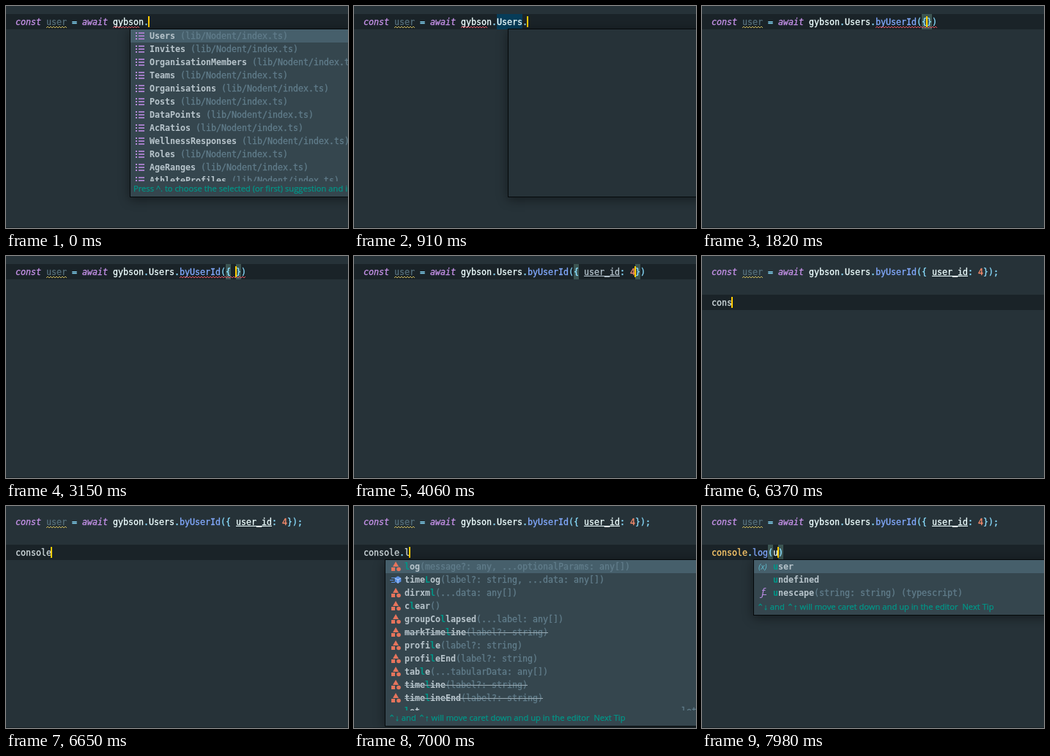
Animation of 467 by 304 pixels, one loop 8 s. Source, as an HTML page with a canvas:

```html
<!DOCTYPE html>
<html lang="en">
<head>
<meta charset="utf-8">
<title>Code completion</title>
<style>
  html, body { margin: 0; width: 100%; height: 100%; overflow: hidden; background: #263238; }
  canvas { display: block; }
</style>
</head>
<body>
<canvas id="stage" width="467" height="304"></canvas>
<script>
const ctx = document.getElementById('stage').getContext('2d');
const W = 467, H = 304, LOOP = 8000;
const LEFT = 13, CH = 7, LINE = 21, ROW = 18;
const MONO = '11.7px "DejaVu Sans Mono", monospace';
const UI = '11.2px "Open Sans", sans-serif';
const C = {
  bg: '#263238', line: '#1a2328', fg: '#eeffff', dim: '#546e7a', keyword: '#c792ea',
  punct: '#89ddff', func: '#82aaff', number: '#f78c6c', cls: '#ffcb6b', caret: '#ffcc00',
  red: '#e0525f', yellow: '#c9b458', brace: '#3c5552', usage: '#073c58',
  list: '#35464e', selected: '#465f6b', name: '#b8c5cc', note: '#617d8b', match: '#009688'
};
const colX = col => LEFT + col * CH;

// Popups: rows are [name, note, icon, deprecated]
const PATH = ' (lib/Nodent/index.ts)';
const tables = names => names.split(' ').map(n => [n, PATH, 'list']);
const methods = names => names.split(' ').map(n => [n, '(params)', 'shapes']);
const PRESS = 'Press ^. to choose the selected (or first) suggestion and insert a dot afterwards';
const MOVE = '⌃↓ and ⌃↑ will move caret down and up in the editor  Next Tip';
const POPUPS = {
  tables: { x: 169, y: 31, tip: PRESS, rows: tables('Users Invites OrganisationMembers Teams Organisations Posts DataPoints AcRatios WellnessResponses Roles AgeRanges AthleteProfiles') },
  tablesU: { x: 169, y: 31, tip: PRESS, match: 'u', rows: tables('Users UserRoles UserTeams UserInvites GroupUsers Surveys Groups Updates Results Measures Units AthleteGroups') },
  emptyMethods: { x: 210, y: 31 },
  methods: { x: 210, y: 31, tip: MOVE, rows: methods('byUserId byEmail findMany insert upsert update softDelete truncate') },
  methodsB: { x: 210, y: 31, h: 59, tip: MOVE, match: 'b', rows: methods('byUserId byEmail') },
  emptyFields: { x: 287, y: 31 },
  fields: { x: 287, y: 31, h: 41, tip: MOVE, match: 'u', rows: [['user_id', '', 'shapes']] },
  emptyConsole: { x: 0, y: 73, h: 229 },
  console: { x: 0, y: 73, h: 41, tip: MOVE, match: 'c', rows: [['console', ': Console', 'var']] },
  emptyLog: { x: 42, y: 73, h: 229 },
  log: { x: 42, y: 73, h: 229, tip: MOVE, match: 'l', rows: [
    ['log', '(message?: any, ...optionalParams: any[])', 'shapes'],
    ['timeLog', '(label?: string, ...data: any[])', 'cube'],
    ['dirxml', '(...data: any[])', 'shapes'],
    ['clear', '()', 'shapes'],
    ['groupCollapsed', '(...label: any[])', 'shapes'],
    ['markTimeline', '(label?: string)', 'shapes', true],
    ['profile', '(label?: string)', 'shapes'],
    ['profileEnd', '(label?: string)', 'shapes'],
    ['table', '(...tabularData: any[])', 'shapes'],
    ['timeline', '(label?: string)', 'shapes', true],
    ['timelineEnd', '(label?: string)', 'shapes', true],
    ['let', ' '.repeat(51) + 'let', '']
  ] },
  emptyArg: { x: 70, y: 73, h: 77 },
  arg: { x: 70, y: 73, h: 77, tip: MOVE, match: 'u', rows: [
    ['user', '', 'var'], ['undefined', '', ''], ['unescape', '(string: string) (typescript)', 'fn']
  ] }
};
const HINTS = {
  query: { x: 12, y: 34, lines: ['params: { user_id: number }', 'options?: { includeDeleted?: boolean }'] },
  log: { x: 45, y: 76, lines: ['message?: any, ...optionalParams: any[]', '...data: any[]'] }
};

// Each step patches the state of the editor
const CALL = 'gybson.Users.byUserId';
const STEPS = [
  [0, { code: 'gybson.', code3: '', caret: 26, row: 0, popup: 'tables', error: [146, 182], braces: [], hint: '', alpha: 1 }],
  [280, { code: 'gybson.U', caret: 27, popup: 'tablesU' }],
  [490, { code: 'gybson.Users', caret: 31, popup: '' }],
  [560, { usage: true }],
  [700, { code: 'gybson.Users.', caret: 32 }],
  [840, { popup: 'emptyMethods' }],
  [980, { popup: 'methods' }],
  [1260, { code: 'gybson.Users.b', caret: 33, popup: 'methodsB' }],
  [1330, { code: CALL, caret: 40, popup: '', usage: false }],
  [1540, { code: CALL + '()', caret: 41, braces: [40, 41], error: null }],
  [1750, { code: CALL + '({})', caret: 42, braces: [41, 42] }],
  [1820, { error: [237, 321] }],
  [2100, { code: CALL + '({ })', caret: 43, braces: [41, 43] }],
  [2310, { error: [237, 328] }],
  [2730, { hint: 'query' }],
  [3010, { alpha: 0.66 }],
  [3080, { alpha: 0.33 }],
  [3150, { hint: '', alpha: 1 }],
  [3360, { code: CALL + '({ u})', caret: 44, braces: [41, 44], error: null }],
  [3430, { popup: 'emptyFields' }],
  [3500, { popup: 'fields' }],
  [3640, { code: CALL + '({ user_id})', caret: 50, braces: [41, 50], popup: '' }],
  [3710, { code: CALL + '({ user_id:})', caret: 51, braces: [41, 51] }],
  [3780, { code: CALL + '({ user_id: })', caret: 52, braces: [41, 52] }],
  [3920, { code: CALL + '({ user_id: 4})', caret: 53, braces: [41, 53] }],
  [4130, { resolved: true }],
  [4270, { code: CALL + '({ user_id: 4 })', caret: 54, braces: [41, 54] }],
  [5040, { code: CALL + '({ user_id: 4})', caret: 53, braces: [41, 53] }],
  [5110, { caret: 54 }],
  [5250, { caret: 55, braces: [40, 54] }],
  [5390, { code: CALL + '({ user_id: 4});', caret: 56, braces: [] }],
  [5810, { row: 1, caret: 0 }],
  [5950, { row: 2 }],
  [6160, { code3: 'c', caret: 1 }],
  [6230, { code3: 'co', caret: 2 }],
  [6300, { code3: 'con', caret: 3 }],
  [6370, { code3: 'cons', caret: 4 }],
  [6440, { code3: 'conso', caret: 5, popup: 'emptyConsole' }],
  [6510, { code3: 'consol', caret: 6, popup: 'console' }],
  [6650, { code3: 'console', caret: 7, popup: '' }],
  [6790, { code3: 'console.', caret: 8 }],
  [6860, { popup: 'emptyLog' }],
  [6930, { code3: 'console.l', caret: 9, popup: 'log' }],
  [7070, { code3: 'console.log', caret: 11, popup: '' }],
  [7140, { code3: 'console.log()', caret: 12, braces: [11, 12] }],
  [7490, { hint: 'log' }],
  [7770, { code3: 'console.log(u)', caret: 13, braces: [11, 13], hint: '', popup: 'emptyArg' }],
  [7840, { typed: true }],
  [7910, { popup: 'arg' }]
];
const stateAt = t => Object.assign({}, ...STEPS.filter(s => s[0] <= t).map(s => s[1]));

function rect(x, y, w, h, color) {
  ctx.fillStyle = color;
  ctx.fillRect(x, y, w, h);
}

// Monospaced text on the whole-pixel editor grid
function mono(text, x, y, color, style = '') {
  ctx.font = style + ' ' + MONO;
  ctx.fillStyle = ctx.strokeStyle = color;
  ctx.lineWidth = 0.3;
  [...text].forEach((ch, i) => {
    ctx.fillText(ch, x + i * CH, y);
    if (!style.includes('bold')) ctx.strokeText(ch, x + i * CH, y);
  });
}

function squiggle(x0, x1, y, color) {
  ctx.beginPath();
  for (let x = x0; x <= x1; x += 2) ctx.lineTo(x, y + ((x - x0) % 4 ? -1 : 1));
  ctx.strokeStyle = color;
  ctx.lineWidth = 1;
  ctx.stroke();
}

function drawCode(text, col, row, s) {
  const y = 26 + row * LINE;
  const pattern = /byUserId|log(?=\()|console|user_id|\w+|[^\w\s]/g;
  for (const { 0: word, index } of text.matchAll(pattern)) {
    const x = colX(col + index);
    let color = C.fg;
    if (/^(byUserId|log)$/.test(word) && text.includes('(')) color = C.func;
    else if (/^\d/.test(word)) color = C.number;
    else if (/^\W/.test(word)) color = C.punct;
    else if (word === 'console' && s.typed) color = C.cls;
    else if (word === 'user_id' && !s.resolved) color = '#b4c3cc';
    else if (row === 2 && !s.typed) color = '#d3dde0';
    mono(word, x, y, color, s.braces.includes(col + index) && s.row === row ? 'bold' : '');
    if (word === 'user_id') rect(x, y + 1, 49, 1, color);
  }
}

const ICONS = {
  list(x, y) {
    for (const dy of [-4, 0, 4]) {
      rect(x - 6, y + dy - 1, 2, 2, '#b48ad6');
      rect(x - 2, y + dy - 1, 8, 2, '#a07cc4');
    }
  },
  shapes(x, y) {
    ctx.fillStyle = '#e5745c';
    ctx.beginPath();
    ctx.moveTo(x, y - 7);
    ctx.lineTo(x + 4, y);
    ctx.lineTo(x - 4, y);
    ctx.fill();
    ctx.fillRect(x - 6, y + 1, 5, 5);
    ctx.beginPath();
    ctx.arc(x + 4, y + 3.5, 2.8, 0, 7);
    ctx.fill();
  },
  cube(x, y) {
    ctx.beginPath();
    for (let i = 0; i < 6; i++) {
      const a = i * Math.PI / 3 + Math.PI / 6;
      ctx.lineTo(x + 3 + 5 * Math.cos(a), y + 5 * Math.sin(a));
    }
    ctx.fillStyle = '#5c92e6';
    ctx.fill();
    ctx.beginPath();
    ctx.moveTo(x - 1, y - 2);
    ctx.lineTo(x + 3, y);
    ctx.lineTo(x + 7, y - 2);
    ctx.moveTo(x + 3, y);
    ctx.lineTo(x + 3, y + 5);
    ctx.strokeStyle = '#bcd5fa';
    ctx.lineWidth = 1;
    ctx.stroke();
    for (const dy of [-3, 0, 3]) rect(x - 8 + (dy ? 2 : 0), y + dy, 5, 1, '#5c92e6');
  },
  var(x, y) {
    ctx.font = 'italic ' + UI;
    ctx.fillStyle = '#5fb9cb';
    ctx.fillText('(x)', x - 8, y + 4);
  },
  fn(x, y) {
    ctx.font = 'italic 14px "DejaVu Sans", sans-serif';
    ctx.fillStyle = '#b78ae0';
    ctx.fillText('ƒ', x - 4, y + 4);
    rect(x - 3, y + 2, 6, 1, '#b78ae0');
  }
};

function panel(x, y, w, h, fill) {
  ctx.save();
  ctx.shadowColor = 'rgba(0,0,0,.45)';
  ctx.shadowBlur = 14;
  ctx.shadowOffsetY = 3;
  rect(x, y, w, h, '#05090b');
  ctx.restore();
  rect(x + 1, y + 1, w - 2, h - 2, fill);
}

function drawRow([name, note, icon, deprecated], x, y, match) {
  const base = y + 13, textX = x + 27;
  if (icon) ICONS[icon](x + 15 - (icon === 'list' ? 1 : 0), y + 9);
  mono(name, textX, base, C.name, 'bold');
  const hit = match ? name.toLowerCase().indexOf(match) : -1;
  if (hit >= 0) {
    // Repaint the matched letter over its own cell
    rect(textX + hit * CH, y + 1, CH, ROW - 3, ctx.rowColor);
    mono(name[hit], textX + hit * CH, base, C.match, 'bold');
  }
  mono(note, textX + name.length * CH, base, C.note);
  if (deprecated) rect(textX, base - 4, (name + note).length * CH, 1, '#9aabb4');
}

function drawPopup({ x, y, h = 231, rows, tip, match }) {
  panel(x, y, 520, h, rows ? C.list : C.bg);
  if (!rows) return;
  ctx.save();
  ctx.beginPath();
  ctx.rect(x + 1, y + 1, 518, h - 23);
  ctx.clip();
  rows.forEach((row, i) => {
    const top = y + 1 + i * ROW;
    ctx.rowColor = i ? C.list : C.selected;
    if (!i) rect(x + 1, top, 518, ROW, C.selected);
    drawRow(row, x, top, match);
  });
  ctx.restore();
  ctx.font = UI;
  ctx.fillStyle = ctx.strokeStyle = C.match;
  ctx.lineWidth = 0.25;
  ctx.fillText(tip, x + 5, y + h - 8);
  ctx.strokeText(tip, x + 5, y + h - 8);
}

function drawHint({ x, y, lines }, alpha) {
  ctx.globalAlpha = alpha;
  panel(x, y, 455 - x, 46, C.list);
  lines.forEach((text, i) => mono(text, x + 9, y + 18 + i * ROW, i ? C.note : C.name));
  ctx.globalAlpha = 1;
}

function draw(t) {
  const s = stateAt(t);
  const top = 11 + s.row * LINE;
  rect(0, 0, W, H, C.bg);
  rect(0, top, W, LINE, C.line);
  rect(0, H - 1, W, 1, '#182126');
  if (s.usage) rect(colX(26), 11, 35, LINE, C.usage);
  s.braces.forEach(col => rect(colX(col), top, CH, LINE, C.brace));

  mono('const', colX(0), 26, C.keyword, 'italic');
  mono('user', colX(6), 26, C.dim);
  mono('=', colX(11), 26, C.punct);
  mono('await', colX(13), 26, C.keyword, 'italic');
  squiggle(55, 83, 29, C.yellow);
  drawCode(s.code, 19, 0, s);
  drawCode(s.code3, 0, 2, s);
  if (s.error) squiggle(...s.error, 29, C.red);
  rect(colX(s.caret) - 1, top + 3, 2, 15, C.caret);

  if (s.hint) drawHint(HINTS[s.hint], s.alpha);
  if (s.popup) drawPopup(POPUPS[s.popup]);
}

let start;
function frame(now) {
  start ??= now;
  draw((now - start) % LOOP);
  requestAnimationFrame(frame);
}
draw(0);
requestAnimationFrame(frame);
</script>
</body>
</html>
```
